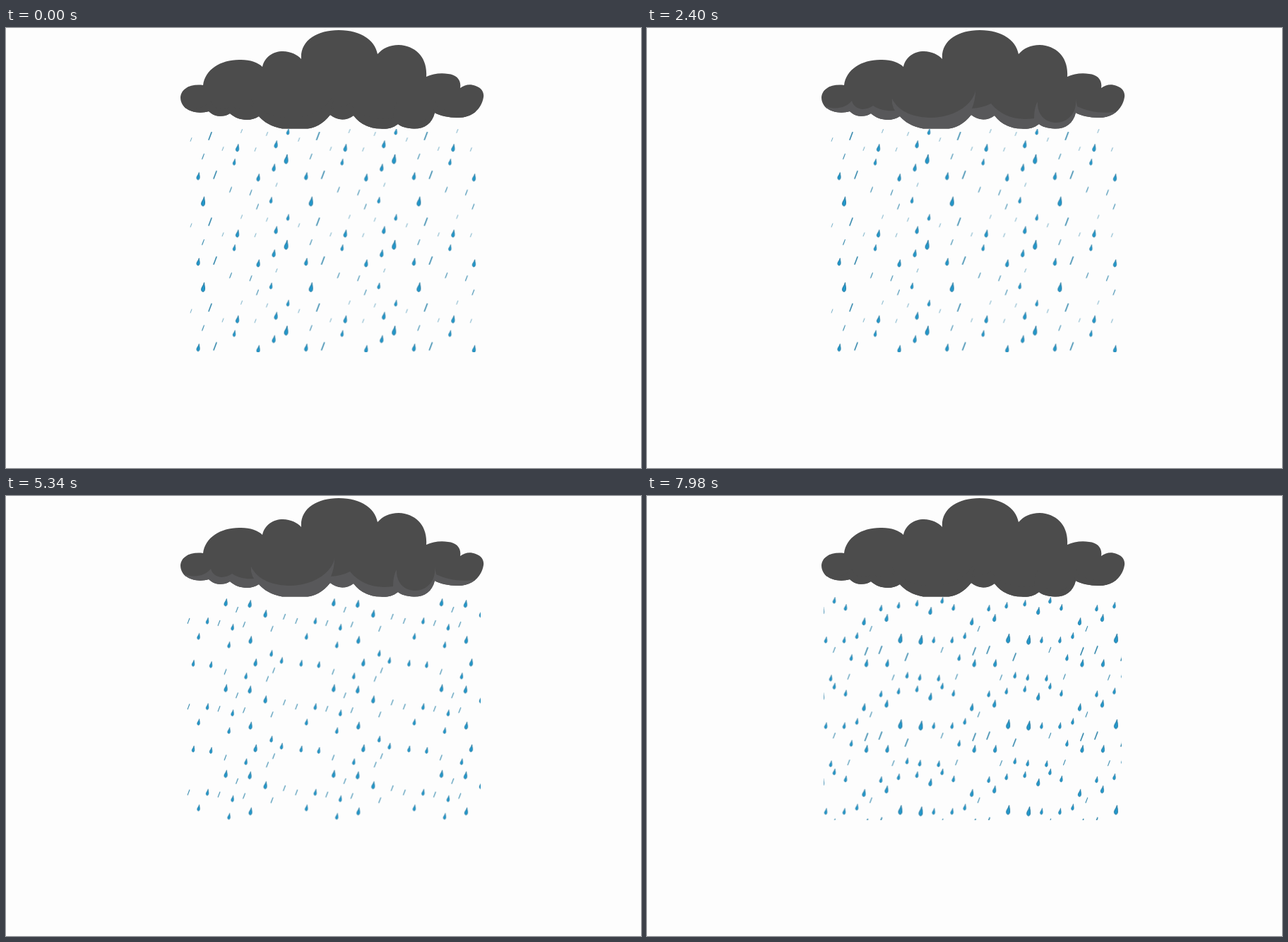
Animation, 899 px wide and 623 px high, one loop 8000 ms. Source, as an HTML page without scripts:

```html
<!DOCTYPE html>
<html lang="en">
<head>
<meta charset="utf-8">
<title>Rain cloud</title>
<style>
  html, body { margin: 0; width: 100%; height: 100%; overflow: hidden; background: #fdfdfd; }
  svg { display: block; width: 100vw; height: 100vh; }

  .drop { fill: #2298cb; stroke: #1b6e96; stroke-width: .8; }
  .streak { fill: none; stroke: #2a82a8; stroke-width: 1.4; stroke-linecap: round; }
  polyline { fill: none; stroke: none; }
  .big { marker: url(#big); }
  .mid { marker: url(#mid); }
  .small { marker: url(#small); }
  .long { marker: url(#long); }
  .short { marker: url(#short); }
  .tiny { marker: url(#tiny); }

  .rain, .shade { animation: 8s step-end infinite; }
  .rain { visibility: hidden; }
  .r1 { animation-name: rain1; }
  .r2 { animation-name: rain2; }
  .r3 { animation-name: rain3; }
  .cloud { fill: #4c4c4c; }
  .shade { animation-name: shade; }

  /* Three rain sheets take turns, 700 ms each */
  @keyframes rain1 {
    0%, 24.5%, 50.75%, 77% { visibility: visible; }
    7%, 33.25%, 59.5%, 85.75%, 100% { visibility: hidden; }
  }
  @keyframes rain2 {
    7%, 33.25%, 59.5%, 85.75% { visibility: visible; }
    0%, 15.75%, 42%, 68.25%, 94.5%, 100% { visibility: hidden; }
  }
  @keyframes rain3 {
    15.75%, 42%, 68.25%, 94.5%, 100% { visibility: visible; }
    0%, 24.5%, 50.75%, 77% { visibility: hidden; }
  }
  /* Underside of the cloud: dark, dim, flash */
  @keyframes shade {
    0%, 8.75%, 17.5%, 26.25%, 35%, 43.75%, 52.5%, 61.25%, 70%, 78.75%, 87.5%, 96.25% { fill: #4c4c4c; }
    3.75%, 12.5%, 21.25%, 30%, 38.75%, 47.5%, 56.25%, 65%, 73.75%, 82.5%, 91.25%, 100% { fill: #58585a; }
    7%, 15.75%, 24.5%, 33.25%, 42%, 50.75%, 59.5%, 68.25%, 77%, 85.75%, 94.5% { fill: #bdbcbe; }
  }
</style>
</head>
<body>
<svg viewBox="0 0 899 623" preserveAspectRatio="none">
  <defs>
    <path id="drop" class="drop" d="M1.4-5.8C1.5-2.8 2.6-.6 2.2 2.4C1.8 5.8-1.7 5.8-2.2 2.8C-2.6 0 .4-2 1.4-5.8Z"/>
    <path id="streak" class="streak" d="M1.8-4.8L-.4 1L-1.8 4.6"/>

    <marker id="big" overflow="visible" markerUnits="userSpaceOnUse"><use href="#drop" transform="scale(1.1 1.2)"/></marker>
    <marker id="mid" overflow="visible" markerUnits="userSpaceOnUse"><use href="#drop" transform="scale(.95)"/></marker>
    <marker id="small" overflow="visible" markerUnits="userSpaceOnUse"><use href="#drop" transform="scale(.8)"/></marker>
    <marker id="long" overflow="visible" markerUnits="userSpaceOnUse"><use href="#streak" transform="scale(1.1)"/></marker>
    <marker id="short" overflow="visible" markerUnits="userSpaceOnUse"><use href="#streak" transform="scale(.75)"/></marker>
    <marker id="tiny" overflow="visible" markerUnits="userSpaceOnUse"><use href="#streak" transform="scale(.5)"/></marker>

    <pattern id="sheet1" patternUnits="userSpaceOnUse" x="255" y="138" width="152.7" height="121.4" viewBox="255 138 152.7 121.4">
      <polyline class="big" points="396.5,186 279,246"/>
      <polyline class="mid" points="382,165 327.5,170 379,198 272,210 357,212"/>
      <polyline class="small" points="399,147 323,190 375,244"/>
      <polyline class="long" points="289,153 296,208"/>
      <polyline class="short" points="279,182 318,229 346.5,233 356,253"/>
      <polyline class="tiny" points="262,158 333.5,146 369.5,150 307,171 353,172 383,222"/>
    </pattern>

    <pattern id="sheet2" patternUnits="userSpaceOnUse" x="250" y="144" width="152.7" height="121.4" viewBox="250 144 152.7 121.4">
      <polyline class="mid" points="311,151 345,153 367,167 346,204 353,236"/>
      <polyline class="small" points="285,177 320.5,186 272.5,199 315.5,211 375.5,223 390,233 265,237 290,239 339.5,255"/>
      <polyline class="short" points="394,171 376.5,188 310.5,249 379,247 370,259"/>
      <polyline class="short" points="327,161 258.5,177 301.5,180 337,182"/>
    </pattern>

    <pattern id="sheet3" patternUnits="userSpaceOnUse" x="241.7" y="142.2" width="152.7" height="121.4" viewBox="241.7 142.2 152.7 121.4">
      <polyline class="big" points="358.5,202 387.5,204"/>
      <polyline class="mid" points="248.3,163 339,173 307,178 310.5,237 340,237"/>
      <polyline class="small" points="265,148 281,158 331,159 356,155 382,152 297,198 253,204 279,204 289,229 368,254 386,257 260,258"/>
      <polyline class="long" points="310.5,220 330.5,218 367.5,228"/>
      <polyline class="short" points="317,188 265,218 348.5,257 285.5,256"/>
    </pattern>

    <path id="cloud" d="M247 98C248 85 262 79 279 81C282 58 305 44 333 45C346 45 357 49 363 55
      C366 41 378 33 392 33C403 33 413 38 418 44C416 18 440 3 471 3C502 3 522 17 526 37
      C533 29 543 24 556 24C580 25 597 42 595 69C604 65 615 63 626 65C638 66 645 74 643 85
      C650 80 657 79 665 82C674 85 677 92 676 98C673 115 660 127 640 127C626 127 614 124 607 120
      C603 136 592 143 577 142.5C567 142 560 140 555 136C546 143 538 143 530 142.5
      C514 142 501 136 492 124C481 132 469 131 459 123C449 136 436 142 427 142.5L391 142.5
      C376 140 365 133 358 125C346 133 328 131 317 121C308 127 295 126 287 118C270 123 247 117 247 98Z"/>
    <clipPath id="inside"><use href="#cloud"/></clipPath>
  </defs>

  <rect class="rain r1" x="250" y="143" width="422" height="316" fill="url(#sheet1)"/>
  <rect class="rain r2" x="250" y="143" width="422" height="316" fill="url(#sheet2)"/>
  <rect class="rain r3" x="250" y="143" width="422" height="316" fill="url(#sheet3)"/>

  <use href="#cloud" class="cloud"/>
  <path class="shade" clip-path="url(#inside)" d="M250 110C266 117 282 113 290 103C293 115 307 119 320 110
    C329 116 340 118 351 117Q346 109 347 100C356 119 378 127 404 127C438 126 463 106 465 88
    Q465 102 460 114Q475 113 487 107C501 124 522 132 548 128Q548 113 553 104
    C552 123 564 134 580 134C597 133 609 119 607 101L609 111C626 119 646 122 668 118L668 150L250 150Z"/>
</svg>
</body>
</html>
```
